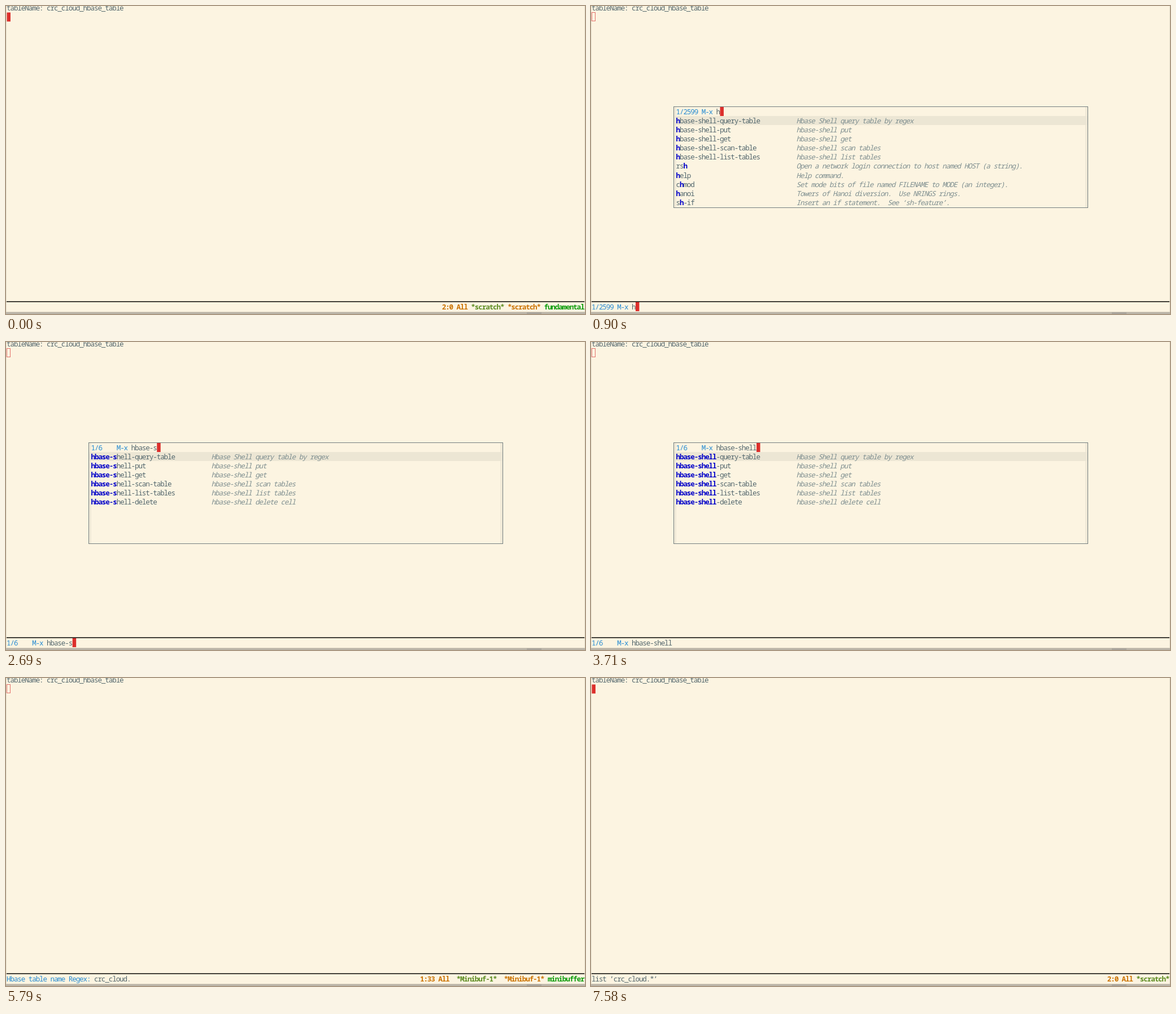
Animation, 1025 px wide and 546 px high, one loop 8000 ms. Source, as an HTML page with a canvas:

```html
<!DOCTYPE html>
<html lang="en">
<head>
<meta charset="utf-8">
<title>Minibuffer session</title>
<style>
html, body { margin: 0; width: 100%; height: 100%; overflow: hidden; background: #fcf4e1; }
canvas { display: block; }
</style>
</head>
<body>
<canvas width="1025" height="546"></canvas>
<script>
const ctx = document.querySelector('canvas').getContext('2d');
const LOOP = 8000, COL = 6.456, ROW = 16.15, ECHO_Y = 525, DESC_COL = 33;
const PAPER = '#fcf4e1', INK = '#53676d', BLUE = '#268bd2', MATCH = '#0000c8', NOTE = '#7f8f90',
  RED = '#dc2f2c', ORANGE = '#cb7200', OLIVE = '#5b8c21', GREEN = '#0a9c0a';

const hbase = [
  ['hbase-shell-query-table', 'Hbase Shell query table by regex'],
  ['hbase-shell-put', 'hbase-shell put'],
  ['hbase-shell-get', 'hbase-shell get'],
  ['hbase-shell-scan-table', 'hbase-shell scan tables'],
  ['hbase-shell-list-tables', 'hbase-shell list tables']];
const hbaseAll = [...hbase, ['hbase-shell-delete', 'hbase-shell delete cell']];
const allCommands = [...hbase,
  ['eval-buffer', 'Execute the accessible portion of current buffer as Lisp code.'],
  ['rsh', 'Open a network login connection to host named HOST (a string).'],
  ['help', 'Help command.'],
  ['find-file', 'Edit file FILENAME.'],
  ['chmod', 'Set mode bits of file named FILENAME to MODE (an integer).']];
const matchingH = [...hbase,
  ['rsh', 'Open a network login connection to host named HOST (a string).'],
  ['help', 'Help command.'],
  ['chmod', 'Set mode bits of file named FILENAME to MODE (an integer).'],
  ['hanoi', 'Towers of Hanoi diversion.  Use NRINGS rings.'],
  ['sh-if', 'Insert an if statement.  See ‘sh-feature’.']];
const matchingHb = [...hbaseAll,
  ['hide-body', 'Hide all body lines in buffer, leaving all headings visible.'],
  ['hs-hide-block', 'Select a block and hide it.'],
  ['hexl-backward-char', 'Move to left ARG bytes (right if ARG negative).'],
  ['hide-ifdef-block', 'Hide the ifdef block enclosing point.']];

const scratch = [['2:0 All ', ORANGE], ['*scratch*', OLIVE]];
const minibuf = pos => [[`1:${pos} All  `, ORANGE], ['*Minibuf-1*  ', OLIVE],
  ['*Minibuf-1* ', ORANGE], ['minibuffer', GREEN]];
const mx = (count, typed, list, shown = typed) =>
  ({ prompt: `1/${count}`.padEnd(7) + 'M-x ', typed, list, shown, cursor: true, mode: [] });
const regex = (typed, pos) =>
  ({ prompt: 'Hbase table name Regex: ', typed, list: null, cursor: true, mode: minibuf(pos) });
const blink = { cursor: false };

// Each step overrides parts of the state before it.
const steps = [
  [0, { prompt: '', typed: '', main: true, cursor: false, list: null,
    mode: [...scratch, [' *scratch* ', ORANGE], ['fundamental', GREEN]] }],
  [150, { ...mx(9847, '', allCommands), main: false, wide: true }],
  [600, blink],
  [900, { ...mx(2599, 'h', matchingH), wide: false }],
  [1340, mx(187, 'hb', matchingHb)],
  [1490, mx(6, 'hbas', hbaseAll, 'hba')],
  [1640, mx(6, 'hbas', hbaseAll)],
  [1940, mx(6, 'hbase', hbaseAll)],
  [2240, mx(6, 'hbase-', hbaseAll)],
  [2690, mx(6, 'hbase-s', hbaseAll)],
  [2840, mx(6, 'hbase-sh', hbaseAll)],
  [2990, mx(6, 'hbase-shel', hbaseAll)],
  [3140, mx(6, 'hbase-shell', hbaseAll)],
  [3710, blink],
  [4150, regex('', 24)],
  [4600, blink],
  [4890, regex('crc_cloud', 33)],
  [5340, regex('crc_cloud.', 33)],
  [5790, blink],
  [5930, regex('crc_cloud.*', 34)],
  [6380, blink],
  [6530, { prompt: '', typed: 'list ’crc_cloud.*’', cursor: false, main: true, mode: scratch }],
  [6980, { main: null }],
  [7580, { main: true }]];

function box(x, y, w, h, color) {
  ctx.fillStyle = color;
  ctx.fillRect(x, y, w, h);
}

// Sets a monospaced run, each glyph centred in its column, and returns where it ends.
function put(text, x, top, color, style = '500') {
  ctx.font = `${style} extra-condensed 12.5px "Noto Sans Mono", "Liberation Mono", monospace`;
  ctx.letterSpacing = '0px';
  const spacing = COL - ctx.measureText('m').width;
  ctx.letterSpacing = spacing + 'px';
  ctx.fillStyle = color;
  ctx.fillText(text, x + spacing / 2, top + 12.5);
  return x + text.length * COL;
}

const block = (x, top) => box(x, top, COL, 16, RED);

function drawCandidate(name, note, query, x, top) {
  let next = 0, end = x;
  for (const char of name) {
    const hit = char === query[next];
    if (hit) next++;
    end = put(char, end, top, hit ? MATCH : INK, hit ? '600' : '500');
  }
  put(note, x + DESC_COL * COL, top, NOTE, 'italic 500');
}

function drawPopup({ prompt, typed, shown, list, wide }) {
  const left = wide ? 143 : 146, width = 1026 - 2 * left, top = 178, x = left + 5;
  box(left, top, width, 180, '#747f80');
  box(left + 1, top + 1, width - 2, 178, '#f0e9d7');
  box(x, top + 1, width - 10, 178, PAPER);
  box(left + 1, top + 17, width - 2, 16, '#ece6d4');
  let end = put(prompt, x, top + 1, BLUE);
  end = put(shown, end, top + 1, INK);
  block(end, top + 1);
  put(typed.slice(shown.length), end, top + 1, PAPER);
  list.forEach(([name, note], i) => drawCandidate(name, note, shown, x, top + 1 + (i + 1) * ROW));
}

function drawWindow() {
  box(0, 0, 1025, 546, PAPER);
  put('tableName: crc_cloud_hbase_table', 1.5, -4.7, INK);
  box(0, 523.4, 1025, 1.6, '#15150f');
  box(0, 0, 1, 542, '#e6dfcd');
  box(1024, 0, 1, 542, '#e6dfcd');
  box(0, 542, 1025, 1, '#d0c9b9');
  box(0, 543, 1025, 3, '#bbb5a9');
  box(922, 543, 26, 3, '#a9a49b');
}

function draw(state) {
  drawWindow();
  if (state.main) block(1.5, 11.5);
  else if (state.main === false) {
    ctx.strokeStyle = '#e4726b';
    ctx.strokeRect(1.5, 11.5, 6, 15);
  }
  const end = put(state.typed, put(state.prompt, 1.5, ECHO_Y, BLUE), ECHO_Y, INK);
  if (state.cursor) block(end, ECHO_Y);
  const modeLength = state.mode.reduce((sum, [text]) => sum + text.length, 0);
  state.mode.reduce((x, [text, color]) => put(text, x, ECHO_Y, color, '600'), 1024 - modeLength * COL);
  if (state.list) drawPopup(state);
}

function tick() {
  const time = performance.now() % LOOP;
  draw(Object.assign({}, ...steps.filter(([start]) => start <= time).map(([, change]) => change)));
  requestAnimationFrame(tick);
}
tick();
</script>
</body>
</html>
```
